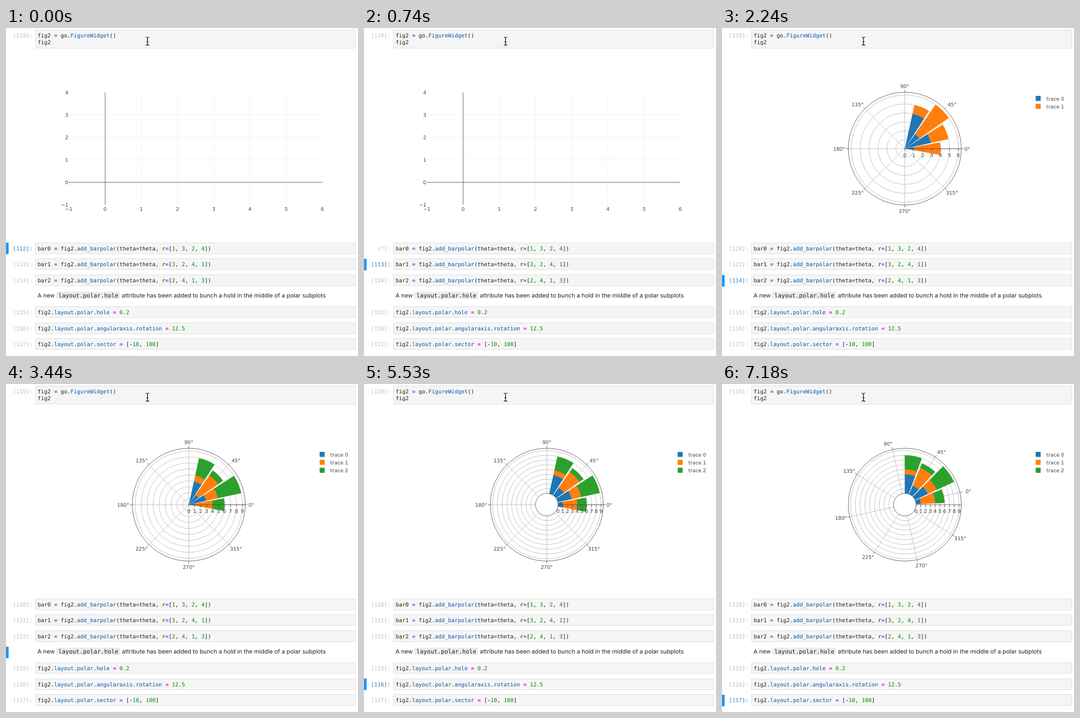
Animation of 673 by 628 pixels, one loop 8 s. Source, as an HTML page:

```html
<!DOCTYPE html>
<html lang="en">
<head>
<meta charset="utf-8">
<title>Polar bar notebook</title>
<style>
  html, body { margin: 0; width: 100%; height: 100%; overflow: hidden; background: #fff; }
  svg { display: block; text-rendering: geometricPrecision; }
  .code { font: 10.4px "DejaVu Sans Mono", monospace; fill: #212121; }
  .prop { fill: #05a; }
  .num { fill: #080; }
  .op { fill: #a2f; font-weight: bold; }
  .prompt { fill: #bdbdbd; text-anchor: end; }
  .active { fill: #307fc1; }
  .prose { font: 11.2px Inter, sans-serif; fill: #212121; }
  .label { font: 9.6px "DejaVu Sans", sans-serif; fill: #444; text-anchor: middle; }
  .start { text-anchor: start; }
  .end { text-anchor: end; }
  .cell { fill: #f5f5f5; stroke: #e0e0e0; }
  .grid, .axis { fill: none; stroke-width: .8; }
  .axis { stroke: #444; }
  .grid { stroke: #b4b4b4; }
  .faint { stroke: #eee; }
</style>
</head>
<body>
<svg id="stage" width="673" height="628" viewBox="0 0 673 628"></svg>
<script>
const LOOP = 8000;
// One entry per hard change: start time, selected row, finished cells
const STEPS = [
  [0, 0, 0], [740, 1, 0], [890, 1, 1], [2240, 2, 2],
  [3440, 3, 3], [4490, 4, 3], [5530, 5, 4], [7180, 6, 5]
];
const VALUES = [[1, 3, 2, 4], [3, 2, 4, 1], [2, 4, 1, 3]];
const COLORS = ['#1f77b4', '#ff7f0e', '#2ca02c'];
const CELLS = [
  ...VALUES.map((v, i) => `bar${i} = fig2.add_barpolar(theta=theta, r=[${v.join(', ')}])`),
  null, // markdown row
  'fig2.layout.polar.hole = 0.2',
  'fig2.layout.polar.angularaxis.rotation = 12.5',
  'fig2.layout.polar.sector = [-10, 100]'
];

const range = (n, f) => Array.from({ length: n }, (_, i) => f(i)).join('');
const text = (x, y, s, cls) => `<text x="${x}" y="${y}" class="${cls}">${s}</text>`;
const label = (x, y, s, cls = '') => text(x, y + 3.5, s, 'label ' + cls);
const path = (d, cls) => `<path d="${d}" class="${cls}"/>`;
const circle = (x, y, r, cls) => `<circle cx="${x}" cy="${y}" r="${r}" class="${cls}"/>`;
const rect = (x, y, w, h, attrs) => `<rect x="${x}" y="${y}" width="${w}" height="${h}" ${attrs}/>`;

function highlight(code) {
  return code.replace(/\.([a-z]\w*)|\b\d[\d.]*|[=-]/gi, (token, prop) =>
    prop ? `.<tspan class="prop">${prop}</tspan>`
         : `<tspan class="${/\d/.test(token) ? 'num' : 'op'}">${token}</tspan>`);
}

const codeLine = (y, s) => text(60.6, y, highlight(s), 'code');
const prompt = (y, s, active) => text(50.8, y, `[${s}]:`, 'code prompt' + (active ? ' active' : ''));

function header() {
  return rect(56.5, 3.5, 612, 35, 'class="cell"') + prompt(18, 119) +
    codeLine(18, 'fig2 = go.FigureWidget()') + codeLine(31, 'fig2') +
    '<path d="M267 17.5Q270 17.5 270.5 19Q271 17.5 274 17.5M270.5 19V31.5M268.5 26.5H272.5' +
    'M267 33Q270 33 270.5 31.5Q271 33 274 33" fill="none" stroke="#000" stroke-width="1.2"/>';
}

function markdown() {
  return text(60.2, 516, 'A new', 'prose') +
    rect(96, 505, 122, 14, 'fill="#ebebeb"') +
    `<text x="100.2" y="516" class="code" style="font-size:11.2px">layout.polar.hole</text>` +
    text(221.6, 516, 'attribute has been added to bunch a hold in the middle of a polar subplots', 'prose') +
    rect(211, 627, 36, 1, 'fill="#ebebeb"');
}

function cells(selected, done, busy) {
  let number = 112;
  let index = 0;
  let out = rect(0, Math.round(411.4 + 30.6 * selected), 5, 22, 'fill="#2196f3"');
  CELLS.forEach((code, row) => {
    if (!code) return;
    const top = Math.floor(411 + 30.6 * row);
    const count = busy && index === 0 ? '*' : index < done ? 120 + index : number;
    out += rect(56.5, top + .5, 612, 21, 'class="cell"') +
      prompt(top + 15, count, row === selected) + codeLine(top + 15, code);
    number++;
    index++;
  });
  return out;
}

function cartesian() {
  const px = v => 189.4 + 69.23 * v;
  const py = v => 295.5 - 43 * v;
  const sign = v => String(v).replace('-', '\u2212');
  const across = y => `M120 ${y}H605`;
  const down = x => `M${x} 123.5V338.5`;
  return path(range(5, i => down(px(i + 1))) + range(3, i => across(py(i + 1))), 'grid faint') +
    path(down(189.5) + across(295.5), 'axis') +
    range(8, i => label(px(i - 1), 346, sign(i - 1))) +
    range(6, i => label(119.2, py(i - 1), sign(i - 1), 'end'));
}

function polar(traces, hole, rotation) {
  const cx = traces > 1 ? 349.5 : 362.5, cy = 231, R = 108;
  const max = [4, 6, 9][traces - 1];
  const inner = R * hole;
  const radius = v => inner + (R - inner) * v * .95 / max;
  const rad = deg => (deg + rotation) * Math.PI / 180;
  const at = (r, deg) => `${cx + r * Math.cos(rad(deg))} ${cy - r * Math.sin(rad(deg))}`;
  const ray = (from, to, deg) => `M${at(from, deg)}L${at(to, deg)}`;

  const sector = (r0, r1, a0, a1) => `M${at(r0, a0)}L${at(r1, a0)}A${r1} ${r1} 0 0 0 ${at(r1, a1)}` +
    `L${at(r0, a1)}A${r0} ${r0} 0 0 1 ${at(r0, a0)}Z`;

  const angleLabel = deg => {
    const cos = Math.cos(rad(deg)), sin = Math.sin(rad(deg)), side = Math.sign(cos);
    const flat = Math.abs(sin) < .01;
    const x = flat ? 114 * side : 115 * cos + 9.5 * side * Math.abs(cos) ** .2;
    return label(cx + x, cy - 119.3 * sin, deg + '°', flat ? (side > 0 ? 'start' : 'end') : '');
  };

  const step = traces > 1 ? 1 : .5;
  const ticks = max / step + 1;
  const tickX = i => cx + radius(i * step);

  let bars = '';
  const base = [0, 0, 0, 0];
  for (let t = 0; t < traces; t++) {
    VALUES[t].forEach((v, i) => {
      const d = sector(radius(base[i]), radius(base[i] + v), 22.5 * i - 10.125, 22.5 * i + 10.125);
      bars += `<path d="${d}" fill="${COLORS[t]}"/>`;
      base[i] += v;
    });
  }

  return range(ticks - 1, i => circle(cx, cy, radius((i + 1) * step), 'grid')) +
    path(range(8, i => ray(inner, R, 45 * i)), 'grid') + bars +
    circle(cx, cy, R, 'axis') + (hole ? circle(cx, cy, inner, 'axis') : '') +
    path(range(8, i => ray(R, R + 4.4, 45 * i)), 'axis') +
    path(`M${cx + inner} ${cy}H${cx + R}` + range(ticks, i => `M${tickX(i)} ${cy}v4.4`), 'axis') +
    range(ticks, i => label(tickX(i), 243.7, i * step)) +
    range(8, i => angleLabel(45 * i));
}

function legend(traces) {
  return range(traces, i => rect(599.7, 130 + 15.2 * i, 9.6, 9.6, `fill="${COLORS[i]}"`) +
    label(620.3, 135 + 15.2 * i, 'trace ' + i, 'start'));
}

const stage = document.getElementById('stage');
let shown = -1;

function frame() {
  const time = performance.now() % LOOP;
  const step = STEPS.findLastIndex(s => s[0] <= time);
  if (step !== shown) {
    shown = step;
    const [, selected, done] = STEPS[step];
    const traces = Math.min(done, 3);
    stage.innerHTML = header() + markdown() + cells(selected, done, step === 1) +
      (traces ? polar(traces, done > 3 ? .2 : 0, done > 4 ? 12.5 : 0) : cartesian()) +
      (traces > 1 ? legend(traces) : '');
  }
  requestAnimationFrame(frame);
}
frame();
</script>
</body>
</html>
```
